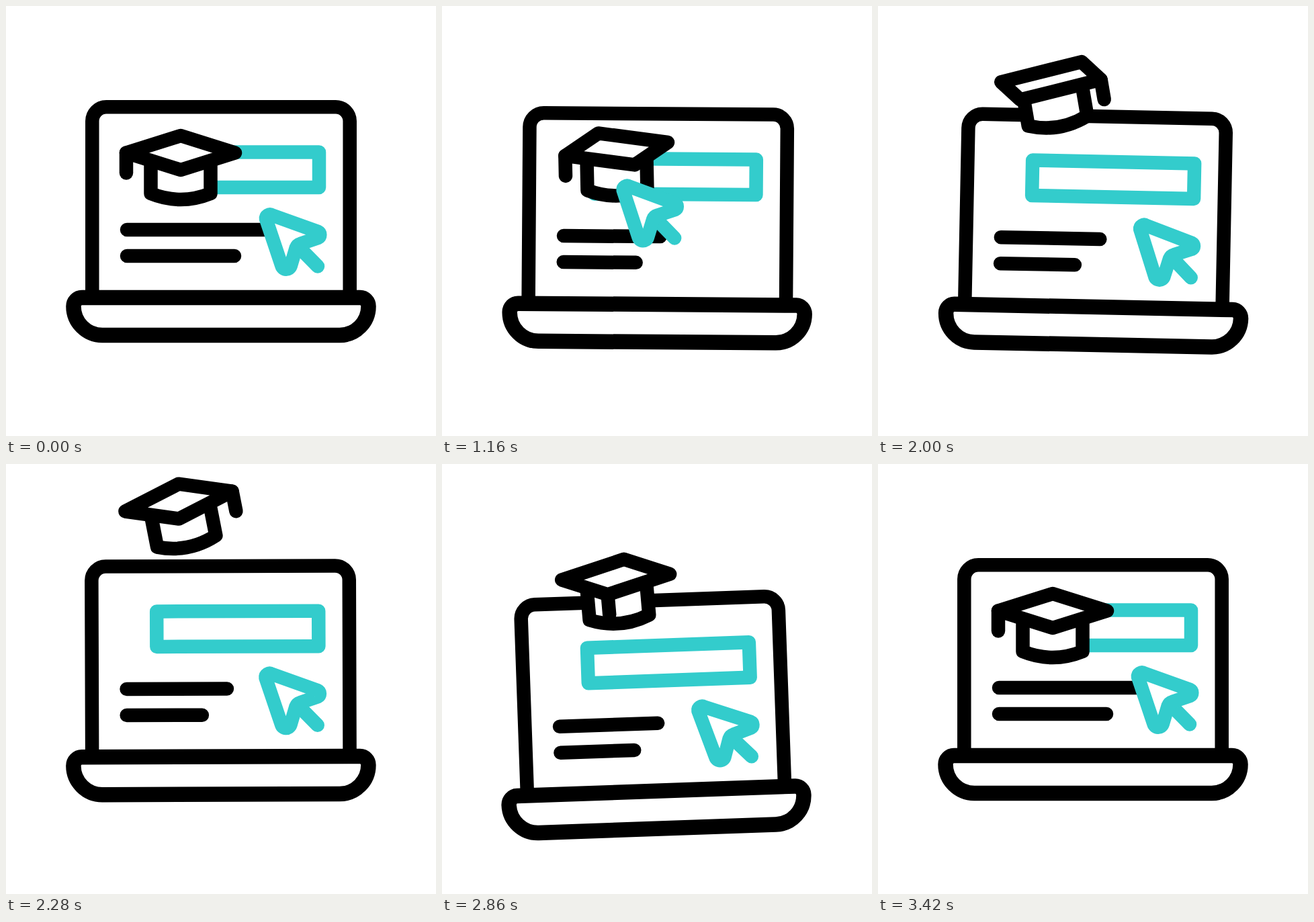
An HTML page that plays this animation: 640x640 px, repeating every 3600 ms.

```html
<!DOCTYPE html>
<html lang="en">
<head>
<meta charset="utf-8">
<title>Online course</title>
<style>
  html, body { margin: 0; height: 100%; overflow: hidden; background: #fff; }
  svg { display: block; width: 100%; height: 100%; }
  path { fill: none; stroke: #000; stroke-width: 20.5; stroke-linecap: round; stroke-linejoin: round; }
  .teal { stroke: #3cc; }
  .solid { fill: #fff; }
</style>
</head>
<body>
<svg viewBox="0 0 640 640">
  <g class="laptop">
    <path d="M128.3 433V171.3a21 21 0 0 1 21-21H490.7a21 21 0 0 1 21 21V433"/>
    <path stroke-width="22" style="stroke-width:22.5" d="M113 434H527A12.5 13 0 0 1 539.5 447A43 43 0 0 1 496.5 490H143.5A43 43 0 0 1 100.5 447A12.5 13 0 0 1 113 434Z"/>
    <path class="teal" d="M225 217.5H466V270H225Z"/>
    <path id="lines"/>
  </g>
  <g id="cap">
    <path class="solid" d="M-44.5 12V60.5Q0 78.5 44.5 60.5V12"/>
    <path class="solid" id="board"/>
    <path id="tassel"/>
  </g>
  <g class="laptop">
    <g id="cursor">
      <path class="teal" d="M434 357L464 387.5"/>
      <path class="teal solid" d="M387 317A5.9 5.9 0 0 1 396 311.3L464.5 336A5 5 0 0 1 464.5 345L438 354Q433.5 355.3 431.7 360L423.7 387A7 7 0 0 1 410.3 386.5Z"/>
    </g>
  </g>
</svg>
<script>
const LOOP = 3600, END = 3420, LINE_PERIOD = END / 4;
const $ = id => document.getElementById(id);
const laptops = document.querySelectorAll('.laptop');

// Smooth monotone curve through [time, value] keys, held flat outside them.
function track(...keys) {
  const slope = i => (keys[i + 1][1] - keys[i][1]) / (keys[i + 1][0] - keys[i][0]);
  const tangent = i => {
    if (i === 0 || i === keys.length - 1) return 0;
    const a = slope(i - 1), b = slope(i);
    return a * b <= 0 ? 0 : 2 * a * b / (a + b);
  };
  return t => {
    if (t <= keys[0][0]) return keys[0][1];
    const i = keys.findIndex(k => k[0] >= t) - 1;
    if (i < 0) return keys[keys.length - 1][1];
    const [t0, v0] = keys[i], [t1, v1] = keys[i + 1];
    const span = t1 - t0, u = (t - t0) / span, w = 1 - u;
    return w * w * (1 + 2 * u) * v0 + u * u * (3 - 2 * u) * v1
      + span * u * w * (w * tangent(i) - u * tangent(i + 1));
  };
}

const drop = track([1040, 0], [1160, 10], [1640, 53], [2000, 14], [2230, 0],
  [2520, 29.3], [2700, 48], [2840, 53], [3260, 11], [END, 0]);
const tilt = track([1040, 0], [1160, .4], [1640, 2.03], [2000, 1.15],
  [2520, -1.27], [2840, -2.03], [3260, -.4], [END, 0]);
const capY = track([1040, 218.5], [1160, 213], [1620, 154], [1660, 151], [2000, 111.5],
  [2190, 44], [2520, 123.5], [2720, 151], [2860, 168], [END, 218.5]);
const spin = track([1040, 0], [1160, 19], [1660, 100], [2000, 155], [2230, 180],
  [2520, 145], [2860, 80], [END, 0]);
const sideSpin = track([1040, 0], [1160, 19], [1660, 94], [2000, 142], [2230, 180],
  [2520, 125], [2860, 84], [END, 0]);
const cursorX = track([0, 0], [560, -141], [1020, -141], [1160, -119], [1620, 0]);
const cursorY = track([0, 0], [560, -93], [960, -93], [1160, -52.5], [1620, 0]);

// Point on the flattened circle that the cap's corners travel along.
function corner(degrees) {
  const a = degrees * Math.PI / 180;
  return [-81 * Math.cos(a), 25.5 * Math.sin(a)];
}

function draw(t) {
  for (const g of laptops)
    g.setAttribute('transform', `translate(0 ${drop(t)}) rotate(${tilt(t)} 320 475)`);
  $('cursor').setAttribute('transform', `translate(${cursorX(t)} ${cursorY(t)})`);

  const shown = .8 + .2 * Math.cos(2 * Math.PI * t / LINE_PERIOD);
  $('lines').setAttribute('d', `M180 333h${213 * shown}M180 372h${160 * shown}`);

  const turn = spin(t);
  const [x, y] = corner(turn), [sx, sy] = corner(sideSpin(t) - 90);
  $('cap').setAttribute('transform', `translate(${260 - turn / 60} ${capY(t)}) rotate(${-turn / 16})`);
  $('board').setAttribute('d', `M${x} ${y}L${sx} ${sy}L${-x} ${-y}L${-sx} ${-sy}Z`);
  $('tassel').setAttribute('d', `M${x} ${y}v30`);
}

function tick() {
  draw(Math.min(performance.now() % LOOP, END));
  requestAnimationFrame(tick);
}
tick();
</script>
</body>
</html>
```
